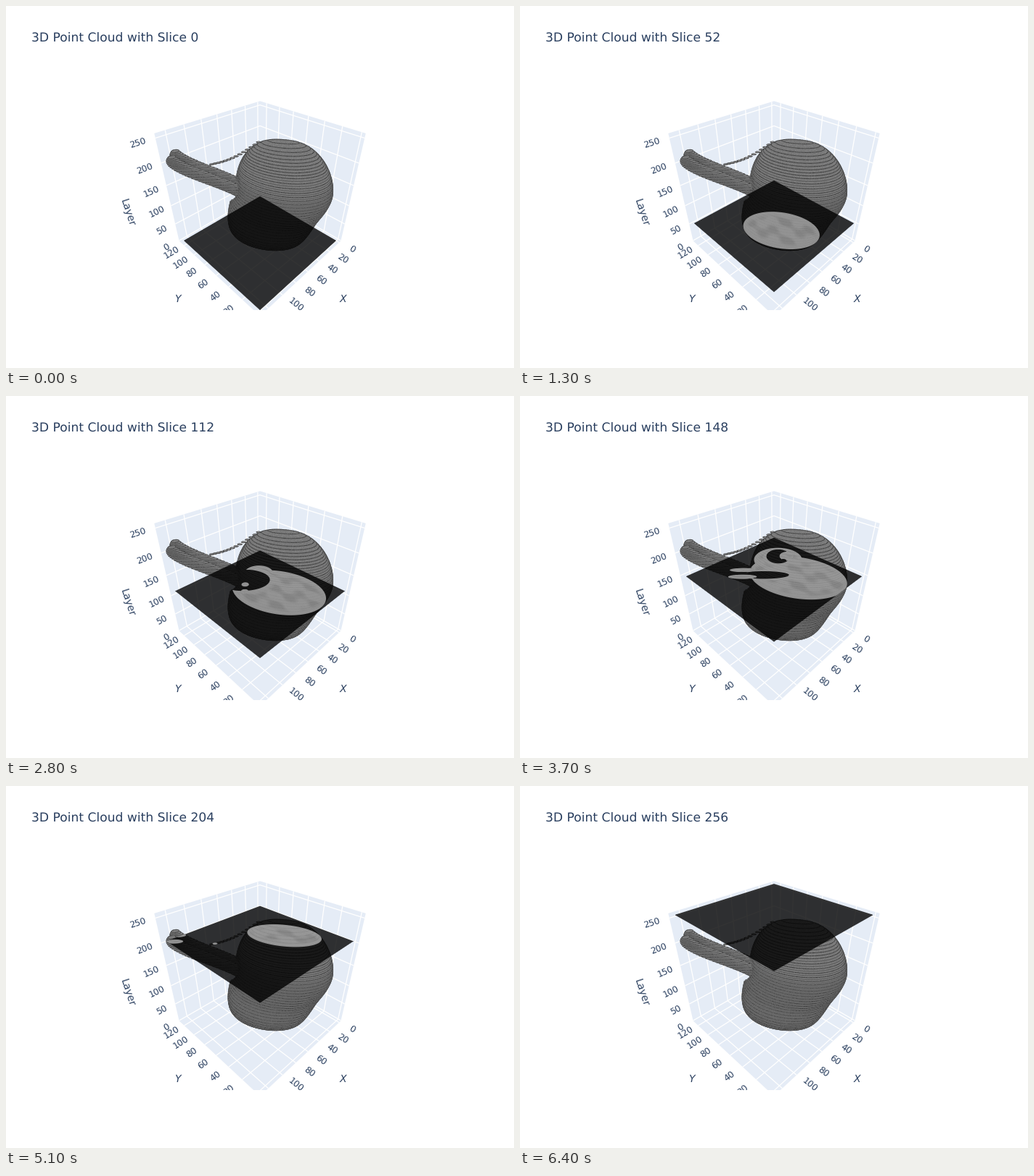
A matplotlib script for the animation above (6.5 s loop, 700 by 500 pixels).

```python
import numpy as np
import matplotlib.pyplot as plt
from matplotlib.animation import FuncAnimation
from matplotlib.patches import Polygon, Rectangle

W, H, DPI = 700, 500, 100
PX = 72 / DPI
INK, PANE = "#2a3f5f", "#e5ecf6"

# Camera at (1.25, -1.25, 1.25) looking at the middle of a unit cube
FOCAL, DIST = 386.6, 1.25 * 3 ** 0.5
SIN, COS = 3 ** -0.5, (2 / 3) ** 0.5
CX, CY = 350, 260
HALF = 0.666              # half diagonal of the slice square
LO, SPAN = -3.8, 134.6    # X and Y axis range
LAYERS, STEP, INTERVAL = 256, 4, 100


def height(s):
    return -0.497 + 0.003852 * s


def project(a, b, z):
    """Cube position (a, b in 0..1, z in -0.5..0.5) to stage pixels."""
    side, front = (1 - a - b) / 2 ** 0.5, (a - b) / 2 ** 0.5
    w = DIST - COS * front - SIN * z
    return CX + FOCAL * side / w, CY - FOCAL * (COS * z - SIN * front) / w


def unproject(x, y, s):
    """Stage pixel to (side, front) on the level of layer s."""
    z, v = height(s), (CY - y) / FOCAL
    front = (COS * z - v * (DIST - SIN * z)) / (SIN - COS * v)
    return (x - CX) * (DIST - COS * front - SIN * z) / FOCAL, front


def smooth(x):
    x = np.clip(x, 0, 1)
    return x * x * (3 - 2 * x)


def dome(q, power=2.0):
    """Radius of a rounded solid at height q, where -1 and 1 are its poles."""
    return max(1 - abs(q) ** power, 0) ** (1 / power)


# Pixel window that holds the scene
X0, X1, Y0, Y1 = 200, 500, 120, 420
PXX, PXY = np.meshgrid(np.arange(X0, X1) + 0.5, np.arange(Y0, Y1) + 0.5)
GRAIN = np.random.default_rng(4).random(PXX.shape)


def oval(side, front, c, g, p, q, shear=0.0):
    """Positive inside an oval centred at (c, g) with radii p and q."""
    if min(p, q) < 0.004:
        return np.full(side.shape, -50.0)
    u = side - c
    return 1 - np.hypot(u / p, (front - g - shear * u) / q)


def body(s, *at):
    q = (s - 130) / (94 if s > 130 else 116)
    size = dome(q, 2.6)
    c = 0.05 + 0.125 * smooth((s - 40) / 110)
    g = 0.08 - 0.09 * smooth((s - 40) / 60) - 0.18 * max(q, 0) ** 3
    return oval(*at, c, g, 0.365 * size, 0.29 * size ** 1.7, 0.17)


def cleft(s, *at):
    """Cut that narrows to a slit on its way up."""
    k, size = np.clip((s - 112) / 36, 0, 1), dome((s - 128) / 42)
    return oval(*at, -0.14 + 0.06 * k, -0.16 + 0.14 * k,
                (0.24 - 0.02 * k) * size, (0.17 - 0.11 * k) * size)


def ball(s, at, mid, half, c, g, p, q):
    size = dome((s - mid) / half)
    return oval(*at, c, g, p * size, q * size)


def stalk(s, at, g):
    """Vessel that leaves the cleft and climbs to the far left."""
    x = (213 - s) / 95
    if not 0 <= x <= 1.1:
        return np.full(at[0].shape, -50.0)
    return oval(*at, -0.62 + 0.5 * smooth(x), g,
                0.03 + 0.36 * max(x * (1 - x), 0), 0.03)


def thread(s, at):
    x = (s - 200) / 40
    if not 0 <= x <= 1:
        return np.full(at[0].shape, -50.0)
    return oval(*at, -0.35 + 0.34 * x, 0.02 - 0.04 * x + 0.06 * np.sin(np.pi * x),
                0.017, 0.014)


def tissue(s, *at):
    lobe = ball(s, at, 145, 42, 0.03 + 0.0012 * (s - 145), -0.26, 0.2, 0.2)
    f = np.maximum(np.minimum(body(s, *at), -ball(s, at, 184, 14, 0, -0.255, 0.075, 0.07)),
                   lobe)
    f = np.minimum(f, -cleft(s, *at))
    f = np.minimum(f, -ball(s, at, 148, 24, 0.036, -0.31, 0.1, 0.12))
    f = np.maximum(f, ball(s, at, 148, 24, 0.115, -0.31, 0.068, 0.078))
    f = np.minimum(f, -ball(s, at, 148, 10, 0.077, -0.24, 0.024, 0.022))
    return np.maximum.reduce([f, stalk(s, at, -0.09), stalk(s, at, 0.005),
                              thread(s, at)])


def pixels(f):
    """Turn a field into a rough distance in pixels from its zero line."""
    gy, gx = np.gradient(f)
    return f / (np.hypot(gx, gy) + 1e-6)


def cover(d):
    return np.clip(d + 0.5, 0, 1)


def point_cloud():
    """Stack the layers from bottom to top, each with a dark dotted rim."""
    tone, alpha = np.zeros(PXX.shape), np.zeros(PXX.shape)
    for k, s in enumerate(range(15, 246, 3)):
        f = tissue(s, *unproject(PXX, PXY, s))
        if f.max() < 0:
            continue
        d = pixels(f)
        strong = 0.58 if k % 2 or s > 190 else 0.36
        rim = np.clip(1.1 - abs(d - 0.5), 0, 1) * strong * (0.6 + 0.8 * GRAIN)
        for m, v in ((cover(d) * 0.93, 0.45 + 0.06 * GRAIN),
                     (np.clip(rim, 0, 1), 0.16)):
            tone = v * m + tone * (1 - m)
            alpha = m + alpha * (1 - m)
    tone = tone / np.maximum(alpha, 1e-6)
    return np.dstack([tone] * 3 + [alpha])


def slice_image(s):
    side, front = unproject(PXX, PXY, s)
    d = pixels(tissue(s, side, front))
    spots = (np.sin(21 * side + 0.05 * s) * np.sin(27 * front - 0.04 * s + 1)
             + 0.5 * np.sin(43 * side - 31 * front + 0.07 * s))
    core = np.clip((d - 3) / 6, 0, 1)
    tone = (0.62 - 0.07 * core * np.clip(spots + 0.3, 0, 1)) * cover(d)
    edge = cover(pixels(1 - (abs(side) + abs(front)) / HALF))
    return np.dstack([tone] * 3 + [0.8 * edge])


plt.rcParams["font.family"] = "DejaVu Sans"
plt.rcParams["text.hinting"] = "none"
fig = plt.figure(figsize=(W / DPI, H / DPI), dpi=DPI, facecolor="white")
ax = fig.add_axes([0, 0, 1, 1])


def label(x, y, text, px, **kw):
    kw = {"ha": "center", "va": "center", "color": INK, "zorder": 2, **kw}
    return ax.text(x, y, text, fontsize=px * PX, **kw)


def pane(*corners):
    ax.add_patch(Polygon([project(*c) for c in corners], fc=PANE, ec="none"))


def rule(*path):
    ax.plot(*zip(*[project(*c) for c in path]), color="white", lw=1.3 * PX,
            solid_capstyle="butt", zorder=1.5)


def tick(value, at, out):
    """Number beside an axis, turned along the outward direction."""
    (x, y), (u, v) = project(*at), project(*out)
    turn = np.degrees(np.arctan2(v - y, abs(u - x)))
    label(u, v, str(value), 12, rotation=turn if u < x else -turn)


pane((0, 0, -.5), (1, 0, -.5), (1, 1, -.5), (0, 1, -.5))
pane((0, 0, -.5), (0, 1, -.5), (0, 1, .5), (0, 0, .5))
pane((0, 1, -.5), (1, 1, -.5), (1, 1, .5), (0, 1, .5))

OUT = 0.12
for n in range(0, 121, 20):
    t = (n - LO) / SPAN
    rule((t, 0, -.5), (t, 1, -.5), (t, 1, .5))
    rule((1, t, -.5), (0, t, -.5), (0, t, .5))
    tick(n, (t, 0, -.5), (t, -OUT, -.5))
    tick(n, (1, t, -.5), (1 + OUT, t, -.5))
for n in range(0, 251, 50):
    z = height(n)
    rule((1, 1, z), (0, 1, z), (0, 0, z))
    tick(n, (1, 1, z), (1 + OUT, 1, z))

label(464, 405.5, "X", 14, style="oblique")
label(236, 405.5, "Y", 14, style="oblique")
label(167, 285, "Layer", 14, rotation=-72)
title = label(35, 50, "", 17.15, ha="left", va="baseline")

window = dict(extent=(X0, X1, Y1, Y0), interpolation="nearest", aspect="auto")
ax.imshow(point_cloud(), zorder=3, **window)
plane = ax.imshow(slice_image(0), zorder=4, **window)
ax.add_patch(Rectangle((0, Y1), W, H - Y1, fc="white", ec="none", zorder=5))
ax.set_xlim(0, W)
ax.set_ylim(H, 0)
ax.axis("off")


def update(i):
    s = STEP * i
    title.set_text(f"3D Point Cloud with Slice {s}")
    plane.set_data(slice_image(s))
    return title, plane


anim = FuncAnimation(fig, update, frames=LAYERS // STEP + 1, interval=INTERVAL,
                     repeat=True, repeat_delay=0, blit=False)
plt.show()
```
